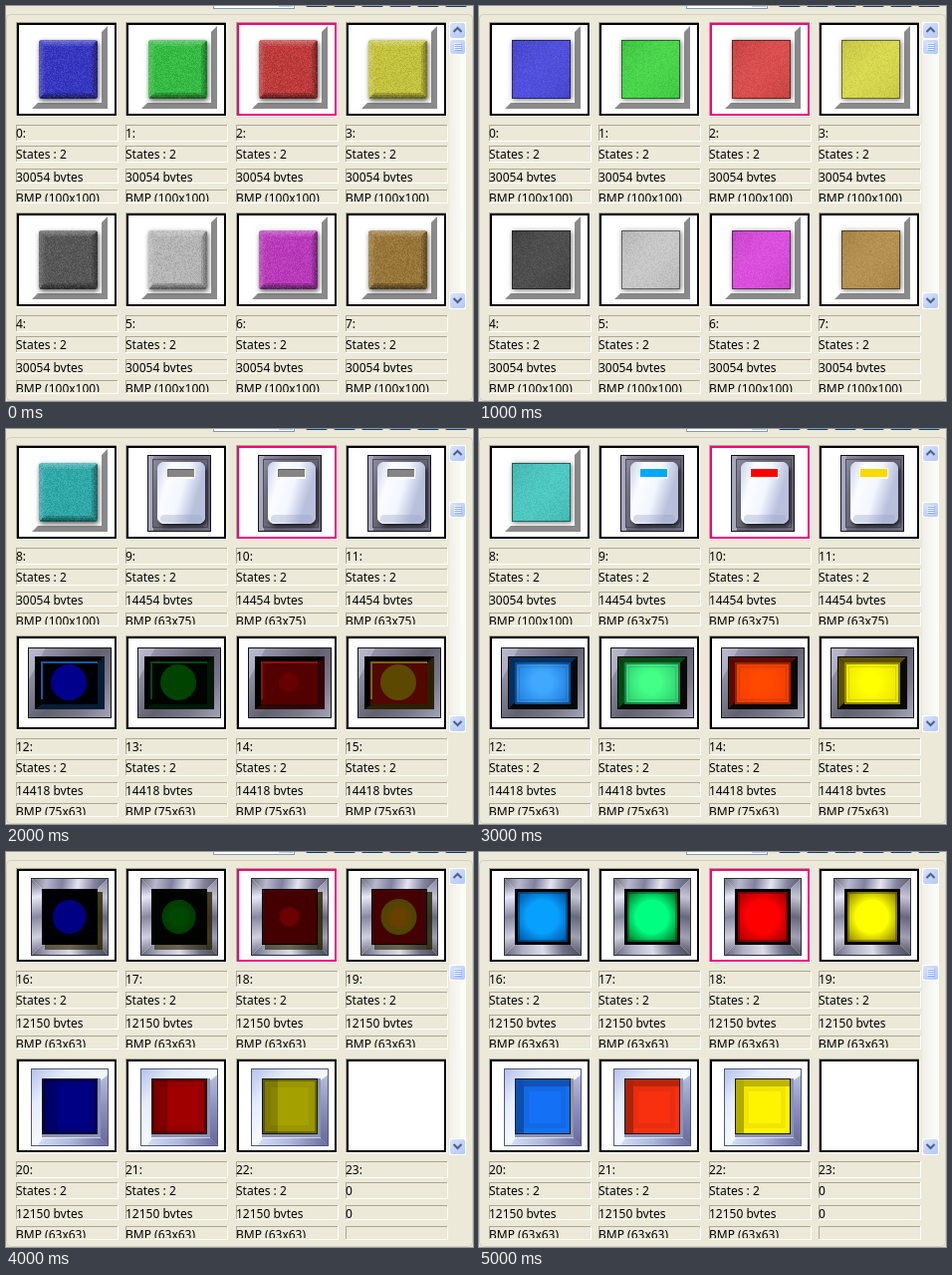
Recreate the animation shown at these times as an HTML page with a canvas. Size 469 px wide and 396 px high, loop 6000 ms.

```html
<!DOCTYPE html>
<html lang="en">
<head>
<meta charset="utf-8">
<title>Button picker</title>
<style>
html, body { margin: 0; width: 100%; height: 100%; overflow: hidden; background: #ece9d8; }
canvas { display: block; width: 469px; height: 396px; }
</style>
</head>
<body>
<canvas id="stage" width="469" height="396"></canvas>
<script>
const ctx = document.getElementById('stage').getContext('2d');
const COLS = [10, 120, 231, 341];
const ROWS = [16, 207];
const THUMB_Y = [33, 73, 113];

// [resting, pressed] face colours of the raised tiles
const TILES = [
  ['#3434c4', '#4848df'], ['#32be40', '#42d844'], ['#c03838', '#dc4646'], ['#c6c63c', '#dada48'],
  ['#565656', '#464646'], ['#b8b8b8', '#c9c9c9'], ['#bc38be', '#de48e0'], ['#9a7636', '#b58f4a'],
  ['#2caaaa', '#46cac2']
];
const SWITCHES = ['#00a8ff', '#ff0000', '#ffd800'];

// off: face, disc, disc radius, edge; on: face, glow, edge
const PANELS = [
  { off: ['#000004', '#00008c', 18, '#1858a0'], on: ['#1c78d8', '#40a8ff', '#003064'] },
  { off: ['#000400', '#004200', 18, '#004818'], on: ['#2cc86c', '#44ff88', '#004a14'] },
  { off: ['#520000', '#680000', 10, '#8c1010'], on: ['#f03c00', '#ff4800', '#600800'] },
  { off: ['#500800', '#5c4800', 18, '#806010'], on: ['#e8e000', '#ffff00', '#5c5000'] }
];
// off: face, disc, disc radius, disc core; on: rim, glow
const LAMPS = [
  { off: ['#000004', '#000080', 17, '#000084'], on: ['#004c98', '#08a0ff'] },
  { off: ['#000400', '#003c00', 17, '#004800'], on: ['#006820', '#00ff80'] },
  { off: ['#440000', '#640000', 10, '#6c0000'], on: ['#940000', '#ff0000'] },
  { off: ['#440000', '#504400', 18, '#684000'], on: ['#887800', '#ffff00'] }
];
const KEYS = [['#000084', '#1470f4'], ['#a00000', '#f83010'], ['#a4a000', '#fff400']];

function rect(x, y, w, h, fill) {
  ctx.fillStyle = fill;
  ctx.fillRect(x, y, w, h);
}

function frame(x, y, w, h, color, t = 1) {
  ctx.strokeStyle = color;
  ctx.lineWidth = t;
  ctx.strokeRect(x + t / 2, y + t / 2, w - t, h - t);
}

function poly(fill, ...pts) {
  ctx.fillStyle = fill;
  ctx.beginPath();
  for (let i = 0; i < pts.length; i += 2) ctx.lineTo(pts[i], pts[i + 1]);
  ctx.fill();
}

function round(x, y, w, h, r, fill) {
  ctx.fillStyle = fill;
  ctx.beginPath();
  ctx.roundRect(x, y, w, h, r);
  ctx.fill();
}

function disc(x, y, r, fill) {
  ctx.fillStyle = fill;
  ctx.beginPath();
  ctx.arc(x, y, r, 0, Math.PI * 2);
  ctx.fill();
}

function linear(x0, y0, x1, y1, ...colors) {
  const g = ctx.createLinearGradient(x0, y0, x1, y1);
  colors.forEach((c, i) => g.addColorStop(i / (colors.length - 1), c));
  return g;
}

function radial(x, y, r0, r1, inner, outer) {
  const g = ctx.createRadialGradient(x, y, r0, x, y, r1);
  g.addColorStop(0, inner);
  g.addColorStop(1, outer);
  return g;
}

function shadow(color, blur, dx, dy, draw) {
  ctx.save();
  ctx.shadowColor = color;
  ctx.shadowBlur = blur;
  ctx.shadowOffsetX = dx;
  ctx.shadowOffsetY = dy;
  draw();
  ctx.restore();
}

// Four mitred sides around a square opening
function bevel(x, y, w, h, t, top, right, bottom, left) {
  const r = x + w, b = y + h;
  poly(top, x, y, r, y, r - t, y + t, x + t, y + t);
  poly(right, r, y, r, b, r - t, b - t, r - t, y + t);
  poly(bottom, x, b, r, b, r - t, b - t, x + t, b - t);
  poly(left, x, y, x, b, x + t, b - t, x + t, y + t);
}

function grain(x, y, w, h, amount, seed) {
  for (let j = 0; j < h; j++) {
    for (let i = 0; i < w; i++) {
      seed = (seed * 1664525 + 1013904223) >>> 0;
      const v = seed / 4294967296 - 0.5;
      const tone = v > 0 ? 255 : 0;
      rect(x + i, y + j, 1, 1, `rgba(${tone},${tone},${tone},${Math.abs(v) * amount})`);
    }
  }
}

function drawTile(x, y, i, on) {
  const color = TILES[i][on];
  poly('#8a8a8a', x + 92, y + 4, x + 92, y + 87, x + 16, y + 87, x + 22, y + 81, x + 86, y + 81, x + 86, y + 10);
  const tx = x + 23, ty = y + 18, s = 59;
  if (on) {
    shadow('rgba(0,0,0,.55)', 5, 1, 1, () => rect(tx, ty, s, s, color));
    rect(tx, ty, s, s, linear(tx, ty, tx + s, ty + s, 'rgba(0,0,0,.1)', 'rgba(255,255,255,.04)', 'rgba(0,0,0,.08)'));
    grain(tx, ty, s, s, 0.14, i + 7);
    frame(tx, ty, s, s, 'rgba(0,0,0,.5)');
    return;
  }
  shadow('rgba(0,0,0,.65)', 5, 1, 2, () => round(tx, ty, s, s, 3, color));
  ctx.save();
  ctx.beginPath();
  ctx.roundRect(tx, ty, s, s, 3);
  ctx.clip();
  for (const t of [2, 4, 6]) {
    bevel(tx, ty, s, s, t, 'rgba(255,255,255,.1)', 'rgba(0,0,0,.14)', 'rgba(0,0,0,.2)', 'rgba(255,255,255,.06)');
  }
  grain(tx, ty, s, s, 0.22, i + 31);
  ctx.restore();
}

function drawSwitch(x, y, color, on) {
  const bx = x + 22, by = y + 10;
  rect(bx, by, 64, 77, linear(bx, by, bx + 64, by + 30, '#9898ac', '#707080', '#626270', '#707082'));
  rect(bx + 1, by + 1, 5, 75, '#a8a8bc');
  frame(bx, by, 64, 77, '#101018');
  frame(bx + 5, by + 4, 56, 69, '#4c4c58');
  shadow('#181820', 4, 2, 3, () => round(bx + 10, by + 7, 48, 62, 7, '#e8ecfa'));
  round(bx + 10, by + 7, 48, 62, 7, linear(bx + 10, by, bx + 58, by + 14, '#c4cce4', '#fafcff', '#f2f6ff', '#b8c0dc'));
  round(bx + 13, by + 60, 42, 8, 5, 'rgba(150,160,196,.35)');
  rect(bx + 19, by + 13, 29, 11, '#ffffff');
  rect(bx + 20, by + 14, 27, 8, on ? color : '#858585');
  if (!on) {
    rect(bx + 20, by + 14, 27, 1, '#565660');
    rect(bx + 20, by + 14, 1, 8, '#686870');
  }
}

function drawPanel(x, y, { off, on: lit }, on) {
  const bx = x + 12, by = y + 12, w = 84, h = 71;
  rect(bx, by, w, h, linear(bx, by, bx + w, by + h, '#a6a6bc', '#86869a', '#60606e', '#787888', '#a8a8ba'));
  poly('rgba(230,230,245,.35)', bx, by, bx + 18, by, bx, by + 34);
  frame(bx, by, w, h, '#101014');
  const cx = x + 53, cy = y + 47;
  rect(bx + 7, by + 9, 70, 53, '#000000');
  if (on) {
    bevel(bx + 8, by + 10, 68, 51, 6, lit[2], '#080808', '#080808', lit[2]);
    rect(bx + 14, by + 15, 56, 42, radial(cx, cy, 10, 34, lit[1], lit[0]));
    frame(bx + 14, by + 15, 56, 42, 'rgba(0,0,0,.4)', 2);
    frame(bx + 18, by + 19, 48, 34, 'rgba(0,0,0,.12)');
    return;
  }
  poly(off[3] + '55', bx + 77, by + 9, bx + 77, by + 62, bx + 7, by + 62, bx + 14, by + 57, bx + 70, by + 57, bx + 70, by + 15);
  rect(bx + 13, by + 14, 57, 43, off[0]);
  disc(cx, cy, off[2], off[1]);
  rect(bx + 13, by + 14, 57, 2, off[3]);
  rect(bx + 13, by + 14, 2, 38, off[3]);
}

function drawLamp(x, y, { off, on: lit }, on) {
  const bx = x + 15, by = y + 10, s = 78, e = bx + s, b = by + s;
  bevel(bx, by, s, s, 12,
    linear(bx, by, e, by + 14, '#68687c', '#b8b8cc', '#8080a0', '#e4e4f0', '#8484a0', '#585868'),
    linear(e, by, e - 14, b, '#80809a', '#c4c4d4', '#68687c', '#a0a0b4', '#484856'),
    linear(bx, b, e, b - 14, '#606078', '#b0b0c4', '#dcdce8', '#707088', '#484854'),
    linear(bx, by, bx + 14, b, '#606074', '#e8e8f8', '#8888a0', '#d0d0e0', '#606074'));
  frame(bx, by, s, s, '#30303a');
  const cx = x + 53.5, cy = y + 49;
  if (!on) {
    rect(e - 12, by + 14, 6, 58, 'rgba(44,40,4,.85)');
    rect(bx + 14, b - 12, 52, 6, 'rgba(44,40,4,.65)');
  }
  rect(bx + 11, by + 11, 56, 56, '#000000');
  if (on) {
    rect(bx + 14, by + 14, 50, 50, radial(cx, cy, 16, 35, lit[1], lit[0]));
    frame(bx + 14, by + 14, 50, 50, 'rgba(0,0,0,.3)', 2);
    disc(cx, cy, 17, lit[1]);
  } else {
    rect(bx + 12, by + 12, 54, 54, off[0]);
    disc(cx, cy, off[2], radial(cx, cy, 8, 14, off[3], off[1]));
  }
}

function drawKey(x, y, colors, on) {
  const bx = x + 15, by = y + 10, s = 78, e = bx + s, b = by + s;
  rect(bx, by, s, s, linear(bx, by, e, b, '#b4c0e8', '#e4ecfc', '#f4f8ff', '#d8e2f6', '#b0b8dc'));
  poly(linear(e, by, e, b, '#c0c8e4', '#8c90bc', '#66689c'), e, by + 6, e, b, e - 8, b - 8, e - 8, by + 12);
  poly(linear(bx, b, e, b, '#dce6fa', '#b0b8dc', '#66689c'), bx + 6, b, e, b, e - 8, b - 8, bx + 12, b - 8);
  frame(bx, by, s, s, '#50587c');
  const kx = x + 26, ky = y + 20, k = 56;
  rect(kx, ky, k + 3, k + 3, '#8c94b0');
  rect(kx, ky, k, k, '#181820');
  rect(kx + 1, ky + 1, k - 2, k - 2, colors[on]);
  if (on) {
    rect(kx + 1, ky + 1, 8, k - 2, 'rgba(0,0,0,.3)');
    rect(kx + 9, ky + 1, k - 10, 7, 'rgba(0,0,0,.26)');
    frame(kx + 9, ky + 8, 42, 42, 'rgba(0,0,0,.06)', 5);
  } else {
    frame(kx + 1, ky + 1, k - 2, k - 2, 'rgba(0,0,0,.3)', 2);
    rect(kx + 1, ky + 1, 15, k - 2, 'rgba(0,0,0,.18)');
    frame(kx + 1, ky + 1, k - 2, k - 2, 'rgba(0,0,0,.06)', 8);
  }
}

function label(x, y, h, base, text) {
  rect(x, y, 103, h, '#ffffff');
  rect(x, y, 102, h - 1, '#aca899');
  rect(x + 1, y + 1, 101, h - 2, '#ece9d8');
  ctx.save();
  ctx.beginPath();
  ctx.rect(x, y, 102, h - 2);
  ctx.clip();
  ctx.fillStyle = '#000000';
  ctx.font = '12px "Noto Sans", "Open Sans", sans-serif';
  ctx.fillText(text, x, base);
  ctx.restore();
}

function info(n) {
  if (n < 9) return ['30054', '100x100'];
  if (n < 12) return ['14454', '63x75'];
  if (n < 16) return ['14418', '75x63'];
  return ['12150', '63x63'];
}

function drawCell(x, y, n, on, selected) {
  rect(x, y, 102, 95, '#ffffff');
  rect(x, y, 101, 94, '#aca899');
  rect(x + 1, y + 1, 100, 93, selected ? '#f4047c' : '#000000');
  rect(x + 3, y + 3, 96, 89, '#ffffff');

  if (n < 9) drawTile(x, y, n, on);
  else if (n < 12) drawSwitch(x, y, SWITCHES[n - 9], on);
  else if (n < 16) drawPanel(x, y, PANELS[n - 12], on);
  else if (n < 20) drawLamp(x, y, LAMPS[n - 16], on);
  else if (n < 23) drawKey(x, y, KEYS[n - 20], on);

  const [bytes, size] = info(n);
  const empty = n === 23;
  label(x, y + 103, 17, y + 116, n + ':');
  label(x, y + 124, 17, y + 137, empty ? '0' : 'States : 2');
  label(x, y + 147, 15, y + 160, empty ? '0' : bytes + ' bytes');
  label(x, y + 168, 14, y + 181, empty ? '' : `BMP (${size})`);
}

function scrollButton(y, h) {
  round(445, y, 17, h, 2, '#ffffff');
  round(446, y + 1, 15, h - 2, 2, linear(446, y, 461, y + h, '#dce6fe', '#c4d4fc', '#b4c8f6'));
}

function arrow(y, dir) {
  ctx.strokeStyle = '#4d6185';
  ctx.lineWidth = 2;
  ctx.beginPath();
  ctx.moveTo(449.5, y - 2 * dir);
  ctx.lineTo(453.5, y + 2 * dir);
  ctx.lineTo(457.5, y - 2 * dir);
  ctx.stroke();
}

function drawScrollbar(thumb) {
  rect(445, 16, 17, 288, linear(445, 0, 462, 0, '#f0efe8', '#fefefb'));
  scrollButton(16, 17);
  arrow(24, -1);
  scrollButton(287, 17);
  arrow(295, 1);
  scrollButton(thumb, 16);
  for (let i = 0; i < 4; i++) {
    rect(450, thumb + 4 + i * 2, 7, 1, '#eef4fe');
    rect(451, thumb + 5 + i * 2, 7, 1, '#8cb0f8');
  }
}

function drawChrome() {
  rect(0, 0, 469, 396, '#ece9d8');
  rect(208, 0, 82, 3, '#7f9db9');
  rect(209, 0, 80, 2, '#ffffff');
  rect(274, 0, 14, 1, '#b8ccf8');
  for (let i = 0; i < 6; i++) round(301 + i * 28, -4, 22, 5, 2, '#003c74');
  ctx.strokeStyle = '#d0d0bf';
  ctx.lineWidth = 1;
  ctx.beginPath();
  ctx.roundRect(0.5, 8.5, 468, 387, 4);
  ctx.stroke();
}

function draw(step) {
  const page = step >> 1, on = step & 1;
  drawChrome();
  for (let i = 0; i < 8; i++) {
    drawCell(COLS[i % 4], ROWS[i >> 2], page * 8 + i, on, i === 2);
  }
  drawScrollbar(THUMB_Y[page]);
}

let shown = -1;
const start = performance.now();

function tick() {
  const step = Math.floor((performance.now() - start) / 1000) % 6;
  if (step !== shown) draw(shown = step);
  requestAnimationFrame(tick);
}
tick();
</script>
</body>
</html>
```
